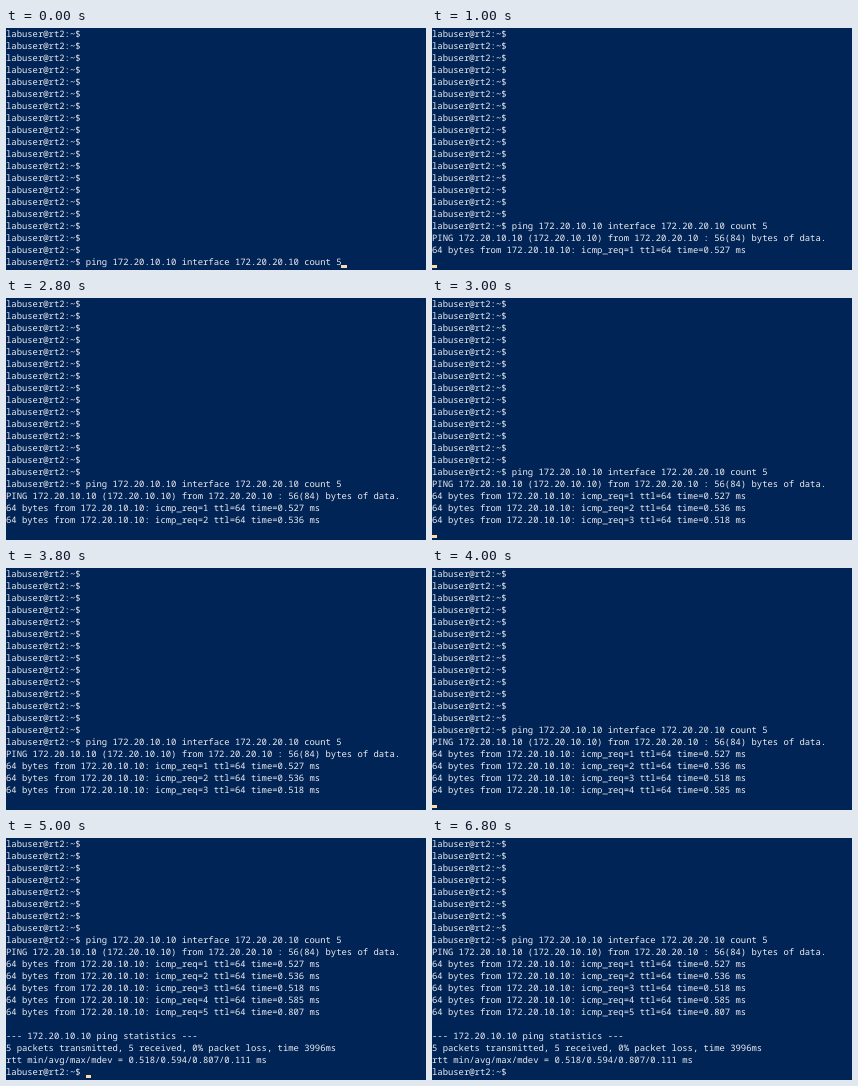
These frames come from a looping animation (420 by 242 pixels, 7400 ms). An HTML page:

```html
<!DOCTYPE html>
<html lang="en">
<head>
<meta charset="utf-8">
<title>Terminal ping</title>
<style>
  html, body { margin: 0; width: 100%; height: 100%; overflow: hidden; background: #012456; }
  #screen, #cursor {
    position: absolute;
    margin: 0;
    font: 8.89px/12px "Noto Sans Mono", monospace;
    text-rendering: geometricPrecision;
  }
  #screen { left: 0; top: 0; color: #eeedf0; white-space: pre; font-variant-ligatures: none; }
  #cursor { top: 237px; width: 1ch; height: 3px; background: #fedba9; }
</style>
</head>
<body>
<pre id="screen"></pre>
<div id="cursor"></div>
<script>
  const LOOP = 7400, STEP = 200, ROWS = 20;
  const BLINK = 530, BLINK_START = 190;
  const PROMPT = "labuser@rt2:~$ ";
  const HOST = "172.20.10.10", SOURCE = "172.20.20.10";

  const reply = (n, ms) => `64 bytes from ${HOST}: icmp_req=${n} ttl=64 time=${ms} ms\n`;

  // Terminal output, each piece printed at its time in ms
  const output = [
    [0, (PROMPT + "\n").repeat(ROWS - 1) +
        `${PROMPT}ping ${HOST} interface ${SOURCE} count 5`],
    [800, "\n"],
    [1000, `PING ${HOST} (${HOST}) from ${SOURCE} : 56(84) bytes of data.\n` + reply(1, "0.527")],
    [2000, reply(2, "0.536")],
    [3000, reply(3, "0.518")],
    [4000, reply(4, "0.585")],
    [5000, reply(5, "0.807") +
        `\n--- ${HOST} ping statistics ---\n` +
        "5 packets transmitted, 5 received, 0% packet loss, time 3996ms\n" +
        "rtt min/avg/max/mdev = 0.518/0.594/0.807/0.111 ms\n" + PROMPT]
  ];

  const screen = document.getElementById("screen");
  const cursor = document.getElementById("cursor");

  function draw(time) {
    const t = Math.min(Math.floor((time % LOOP) / STEP) * STEP, 6800);
    const printed = output.filter(([at]) => at <= t).map(([, text]) => text).join("");
    const lines = printed.split("\n").slice(-ROWS);
    const text = lines.join("\n");
    if (screen.textContent !== text) screen.textContent = text;

    const blinks = Math.floor((t - BLINK_START) / BLINK);
    cursor.style.left = lines[ROWS - 1].length + "ch";
    cursor.style.visibility = blinks % 2 ? "visible" : "hidden";
  }

  const start = performance.now();
  function frame() {
    draw(performance.now() - start);
    requestAnimationFrame(frame);
  }
  frame();
</script>
</body>
</html>
```
